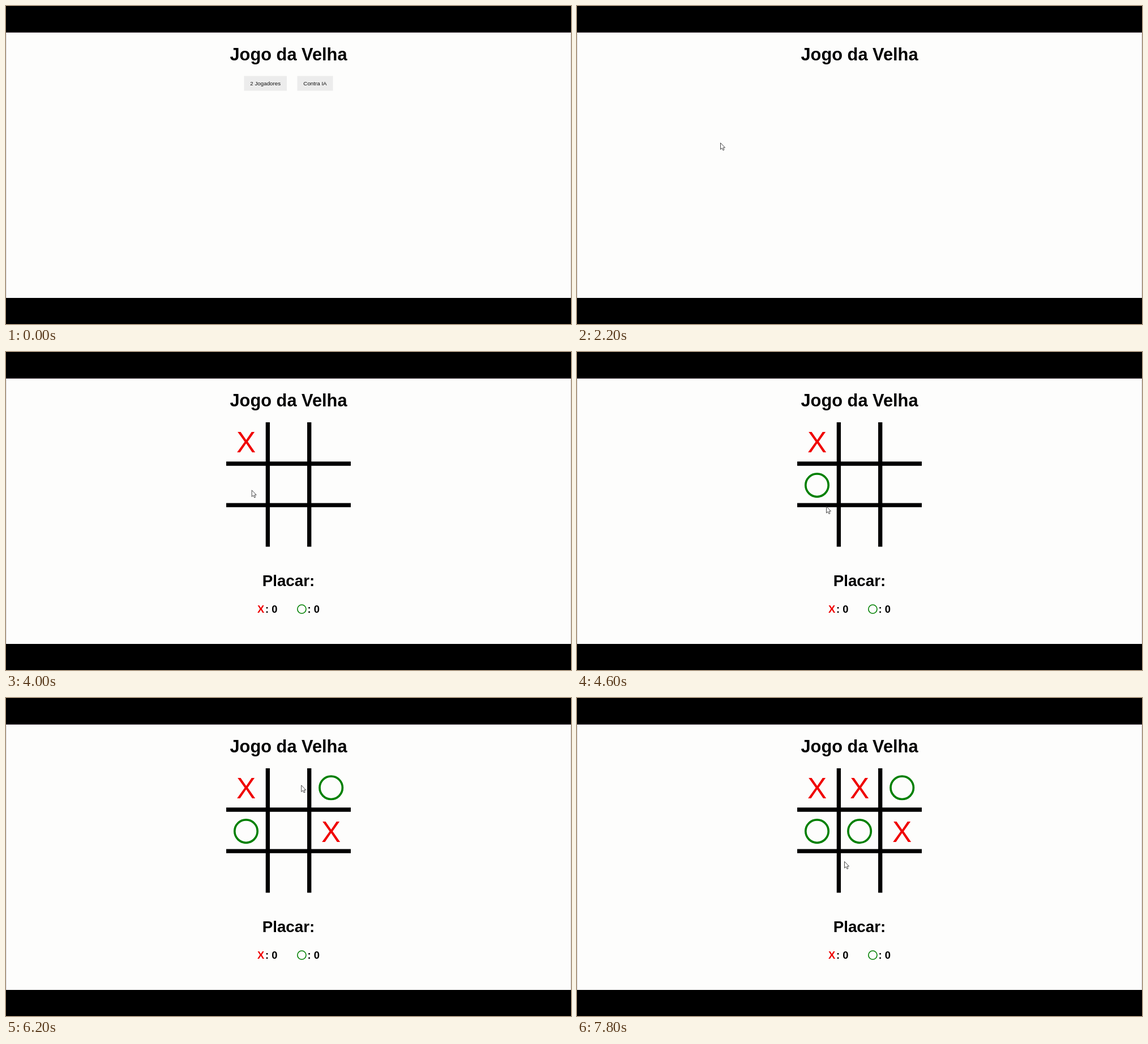
Write an HTML page that moves like this. It is 998 px wide and 561 px high and loops after 8 s.

```html
<!DOCTYPE html>
<html lang="pt">
<head>
<meta charset="utf-8">
<title>Jogo da Velha</title>
<style>
  html, body { margin: 0; width: 100%; height: 100%; overflow: hidden; background: #000; }
  svg { display: block; width: 100%; height: 100%; font-family: "Liberation Sans", Arial, sans-serif; }
  .bold { font-weight: bold; }
  .mid { text-anchor: middle; }
  .red { fill: #f00000; }
  .ring { fill: none; stroke: #008000; }
</style>
</head>
<body>
<svg viewBox="0 0 998 561">
  <rect y="46" width="998" height="469" fill="#3a3038"/>
  <rect y="47" width="998" height="468" fill="#dcdbde"/>
  <rect x="1" y="47" width="996" height="468" fill="#fdfdfc"/>
  <text class="bold mid" x="499" y="96" font-size="30.8">Jogo da Velha</text>

  <g id="menu" class="mid" font-size="9.78" fill="#111">
    <path d="M420.5 123.5h75.5v26h-75.5zM514.5 123.5h63v26h-63z" fill="#ececec"/>
    <text x="458.2" y="140">2 Jogadores</text>
    <text x="546" y="140">Contra IA</text>
  </g>

  <g id="game">
    <path d="M462.4 124V343.5M535.7 124V343.5M389 197H609M389 270.2H609" stroke="#000" stroke-width="7.33"/>
    <text class="bold mid" x="499" y="413" font-size="27.8">Placar:</text>
    <g class="bold" font-size="18.33">
      <text class="red" x="444" y="460">X</text>
      <text x="458" y="460">: 0</text>
      <circle class="ring" cx="522.4" cy="453.6" r="7.6" stroke-width="1.6"/>
      <text x="532.6" y="460">: 0</text>
    </g>
  </g>
  <g id="marks"></g>

  <path id="arrow" d="M.5 .5V12L3.2 9.6L5 13.6L6.9 12.8L5.2 8.9H8.5Z" fill="#fff" stroke="#333" stroke-width=".9"/>
  <path id="beam" d="M-2.5 -5.5H2.5M0 -5.5V5.5M-2.5 5.5H2.5" stroke="#555"/>
</svg>
<script>
  const LOOP = 8000, STEP = 200, FIRST_MOVE = 3800, MOVE_GAP = 700;
  const byId = id => document.getElementById(id);
  const clamp = v => Math.min(1, Math.max(0, v));
  const mix = (a, b, k) => a + (b - a) * k;

  // Cells in playing order, counted row by row; X and O alternate.
  const marks = [...'035214'].map((cell, turn) => {
    const x = 424 + cell % 3 * 75.1, y = 158.3 + Math.floor(cell / 3) * 76.8;
    const isX = turn % 2 === 0;
    const node = document.createElementNS('http://www.w3.org/2000/svg', isX ? 'text' : 'circle');
    const attrs = isX
      ? { class: 'red mid', x, y: y + 18.7, 'font-size': 51.3 }
      : { class: 'ring', cx: x, cy: y, r: 20.2, 'stroke-width': 3.7 };
    for (const name in attrs) node.setAttribute(name, attrs[name]);
    if (isX) node.textContent = 'X';
    byId('marks').append(node);
    return node;
  });

  // Pointer stops, with easing between them
  const stops = [
    { t: 200, x: 299, y: 266 }, { t: 1200, x: 560, y: 138 },
    { t: 2200, x: 253, y: 241 }, { t: 3200, x: 424, y: 199 },
    { t: 4600, x: 440, y: 272 }, { t: 5000, x: 562, y: 240 },
    { t: 5600, x: 564, y: 145 }, { t: 6600, x: 498, y: 158 },
    { t: 7000, x: 482, y: 215 }, { t: 7800, x: 472, y: 288 }
  ];

  function pointerAt(t) {
    const next = Math.max(1, stops.findIndex(stop => stop.t >= t));
    const a = stops[next - 1], b = stops[next];
    const k = clamp((t - a.t) / (b.t - a.t));
    const eased = k * k * (3 - 2 * k);
    return [mix(a.x, b.x, eased), mix(a.y, b.y, eased)];
  }

  function show(node, visible) {
    node.style.visibility = visible ? 'visible' : 'hidden';
  }

  function draw(now) {
    const t = Math.floor(now % LOOP / STEP) * STEP;
    byId('menu').style.opacity = clamp((2000 - t) / 600);
    byId('game').style.opacity = clamp((t - 2200) / 600);
    marks.forEach((node, turn) => show(node, t >= FIRST_MOVE + turn * MOVE_GAP));

    const [x, y] = pointerAt(t);
    const overText = t >= 6800 && t < 7400;
    for (const id of ['arrow', 'beam']) {
      byId(id).setAttribute('transform', `translate(${x} ${y})`);
      show(byId(id), t >= 200 && (id === 'beam') === overText);
    }
    requestAnimationFrame(draw);
  }
  draw(0);
</script>
</body>
</html>
```
